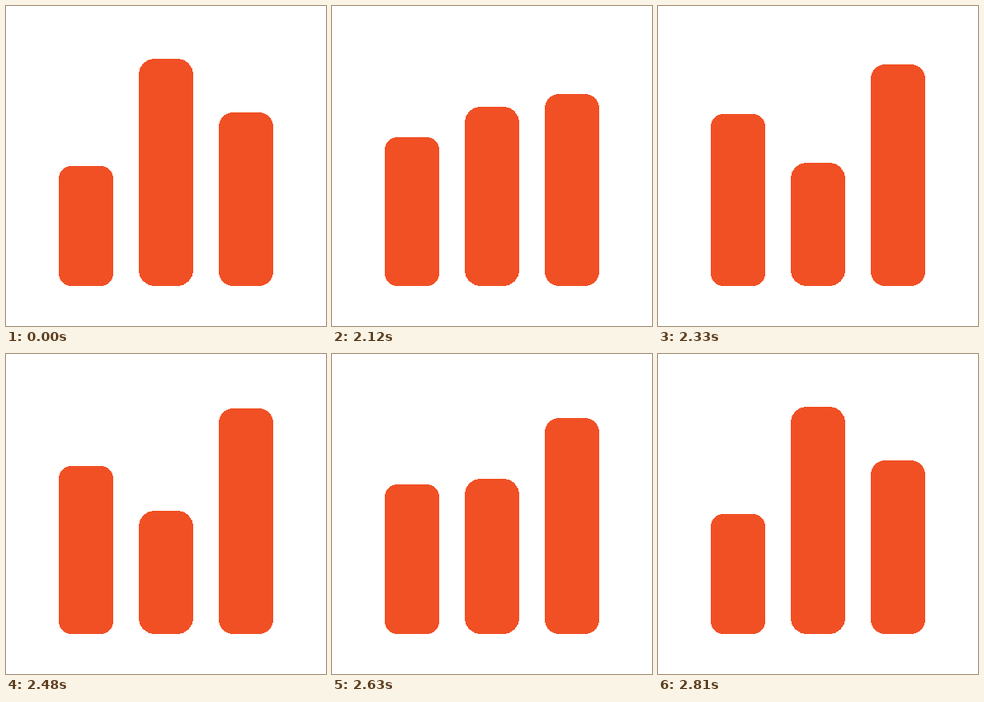
An HTML page for the animation above (3230 ms loop, 400 by 400 pixels).

```html
<!DOCTYPE html>
<html lang="en">
<head>
<meta charset="utf-8">
<title>Bar chart</title>
<style>
  html, body { margin: 0; width: 100%; height: 100%; overflow: hidden; background: #fff; }
  svg { display: block; width: 100%; height: 100%; }
  rect { fill: #f15025; shape-rendering: crispEdges; }
</style>
</head>
<body>
<svg viewBox="0 0 400 400">
  <rect x="66" width="68" rx="16"/>
  <rect x="166" width="68" rx="20"/>
  <rect x="266" width="68" rx="18"/>
</svg>
<script>
const LOOP = 3230, REST = 2000, STEP = 30, BASE = 350, BEGIN = 0.5;
const rects = document.querySelectorAll('rect');

// Each bar moves by `travel` pixels until step `peak`, then is back at step `end`
const bars = [
  { top: 200, travel: -65, peak: 11.3, end: 25.7 },
  { top: 66, travel: 133, peak: 13.4, end: 26 },
  { top: 133, travel: -65, peak: 16, end: 26.2 }
];

// The curve cubic-bezier(.25, .1, .25, 1), solved by bisection
function ease(x) {
  const bezier = (a, b, s) => 3 * a * s * (1 - s) ** 2 + 3 * b * s * s * (1 - s) + s ** 3;
  let low = 0, high = 1;
  for (let i = 0; i < 20; i++) {
    const mid = (low + high) / 2;
    if (bezier(0.25, 0.25, mid) < x) low = mid; else high = mid;
  }
  return bezier(0.1, 1, low);
}

// The way back is the way out in reverse
function progress(step, { peak, end }) {
  const x = step < peak ? (step - BEGIN) / (peak - BEGIN) : (end - step) / (end - peak);
  return x > 0 ? ease(x) : 0;
}

function draw(time) {
  const step = Math.floor((time % LOOP - REST) / STEP);
  bars.forEach((bar, i) => {
    const y = Math.round(bar.top + bar.travel * progress(step, bar));
    rects[i].setAttribute('y', y);
    rects[i].setAttribute('height', BASE - y);
  });
}

const start = performance.now();
function tick() {
  draw(performance.now() - start);
  requestAnimationFrame(tick);
}
tick();
</script>
</body>
</html>
```
